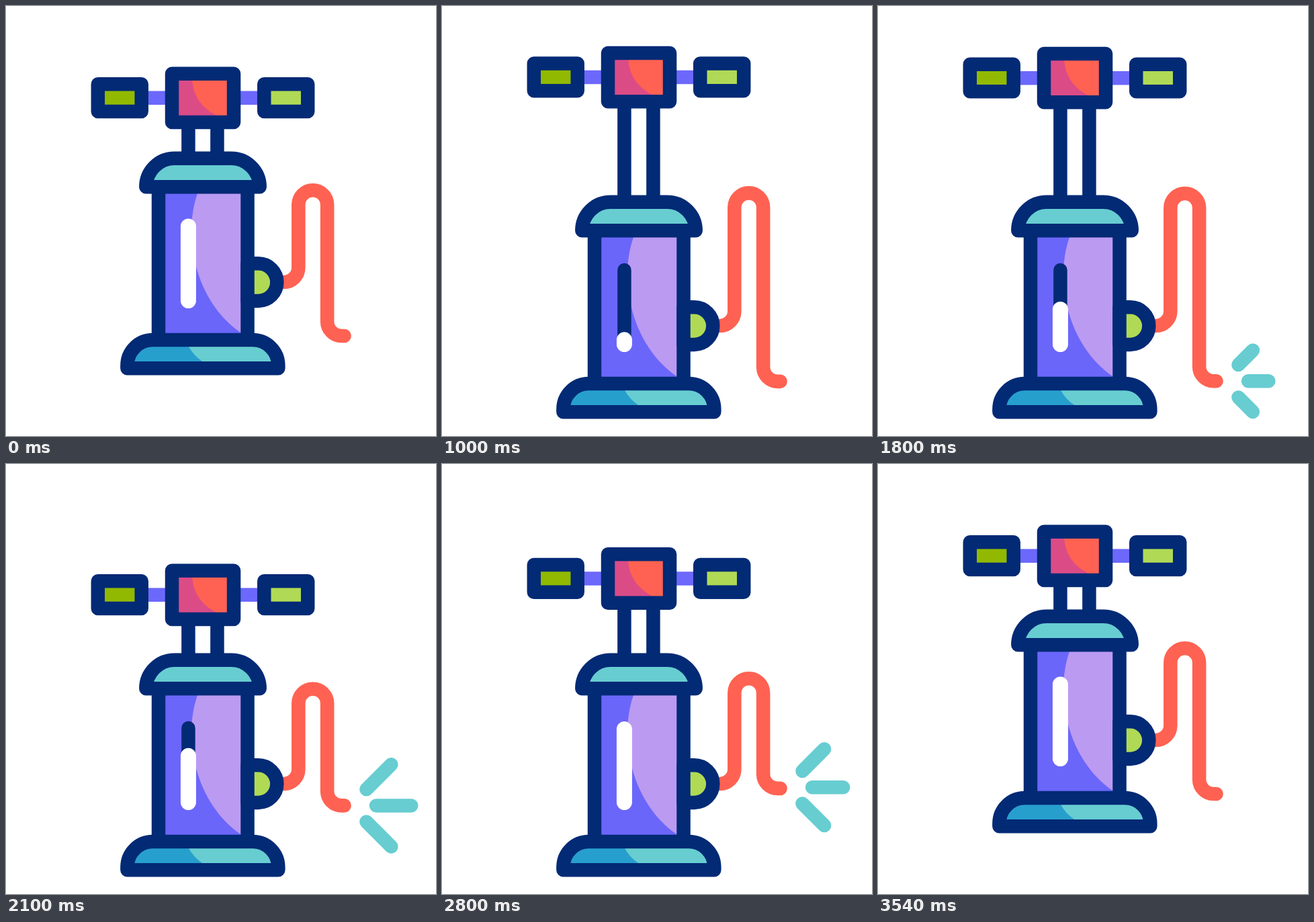
An HTML page with a canvas that plays this animation: 640x640 px, repeating every 3.6 s.

```html
<!DOCTYPE html>
<html lang="en">
<head>
<meta charset="utf-8">
<title>Air pump</title>
<style>
  html, body { margin: 0; width: 100%; height: 100%; overflow: hidden; background: #fff; }
  canvas { display: block; }
</style>
</head>
<body>
<canvas id="stage" width="640" height="640"></canvas>
<script>
const ctx = document.getElementById('stage').getContext('2d');

const NAVY = '#032a75', CORAL = '#ff6252', PINK = '#db4c87', TEAL = '#67cdd1', BLUE = '#279fcd';
const VIOLET = '#6b66fa', LILAC = '#bb9af2', OLIVE = '#92b902', LIME = '#b0da55';
const LINE = 20.5;

// Timing in ms
const LOOP = 3600, PUMP_START = 596, STROKE = 392.5, PUMP_END = PUMP_START + 6 * STROKE;
const LIFT_START = 2975, LIFT_END = 3545;
const FILL_START = 990, FILL_END = 2830;
const BURST_START = PUMP_START + STROKE, FADE_START = 2960, FADE_END = 3352;

// Distances in px
const DROP = 65, HEAD_RISE = 96, ARCH_RISE = 61;
const HOSE = { rest: 491, short: 381, mid: 439.4, long: 494 };
const SLIDER = { bottom: 438.5, full: 110.6, low: 6 };

const clamp = x => Math.min(1, Math.max(0, x));
const progress = (t, a, b) => clamp((t - a) / (b - a));
const ease = x => x * x * (3 - 2 * x);
const mix = (a, b, k) => a + (b - a) * k;

function fill(path, color) {
  ctx.fillStyle = color;
  ctx.fill(new Path2D(path));
}

function stroke(path, color = NAVY, width = LINE, cap = 'round') {
  ctx.strokeStyle = color;
  ctx.lineWidth = width;
  ctx.lineCap = cap;
  ctx.lineJoin = 'round';
  ctx.stroke(new Path2D(path));
}

function shape(path, color) {
  fill(path, color);
  stroke(path);
}

function at(y, draw) {
  ctx.save();
  ctx.translate(0, y);
  draw();
  ctx.restore();
}

function drawHead() {
  stroke('M205 136.8H380', '#6c68fb', LINE, 'butt');
  shape('M136.8 116.3H201.7V157H136.8Z', OLIVE);
  shape('M384.2 116.3H449.2V157H384.2Z', LIME);
  fill('M247 100.7H339V173H247Z', CORAL);
  fill('M247 100.7H277V110.5Q280 146 313 163V173H247Z', PINK);
  stroke('M247 100.7H339V173H247Z');
}

function drawBody(level) {
  fill('M227 269H359.5V497H227Z', LILAC);
  fill('M227 269H288L285 279C262 345 283 440 349 486V497H227Z', VIOLET);
  stroke('M271.4 328V438.5');
  if (level > 0) {
    stroke(`M271.4 ${SLIDER.bottom - level}V${SLIDER.bottom}`, '#fff', 23);
  }
  stroke('M227 269V497M359.5 269V497');
  shape('M359.5 383.3H375.5A27.8 27.8 0 0 1 375.5 438.9H359.5Z', LIME);
  shape('M208.3 269.3A42.6 42.6 0 0 1 250.9 226.7H335.1A42.6 42.6 0 0 1 377.7 269.3Z', TEAL);

  const base = 'M180.4 539.3V535A38 38 0 0 1 218.4 497H367.3A38 38 0 0 1 405.3 535V539.3Z';
  fill(base, TEAL);
  fill('M180.4 539.3V535A38 38 0 0 1 218.4 497H268L272 507Q279 520 292 529V539.3Z', BLUE);
  stroke(base);
}

function drawHose(arch, end) {
  stroke(`M411 411H413.5A21.8 21.8 0 0 0 435.3 389.2V${arch}A21.4 21.4 0 0 1 478.1 ${arch}` +
    `V${end - 21.5}A21.5 21.5 0 0 0 499.6 ${end}H503.5`, CORAL, 20.6);
}

function drawBurst(y, from, to) {
  if (to - from < 0.3) return;
  const near = from * Math.SQRT1_2, far = to * Math.SQRT1_2;
  stroke(`M${551 + from} ${y}H${551 + to}`, TEAL);
  for (const side of [-1, 1]) {
    stroke(`M${536.4 + near} ${y + side * (24.2 + near)}L${536.4 + far} ${y + side * (24.2 + far)}`, TEAL);
  }
}

function draw(t) {
  const down = t < LIFT_START
    ? ease(progress(t, 0, PUMP_START))
    : 1 - ease(progress(t, LIFT_START, LIFT_END));
  const drop = DROP * down;

  // Even strokes pull the handle up, odd strokes push it down
  const pumping = t >= PUMP_START && t < PUMP_END;
  const steps = (t - PUMP_START) / STROKE;
  const index = Math.floor(steps);
  const part = ease(steps - index);
  const lift = pumping ? (index % 2 ? 1 - part : part) : 0;

  const low = index === 0 || index === 5 ? HOSE.short : HOSE.mid;
  const end = pumping ? mix(low, HOSE.long, lift) : mix(HOSE.rest, HOSE.short, down);

  const level = t < FILL_START
    ? mix(SLIDER.full, SLIDER.low, down)
    : mix(SLIDER.low, SLIDER.full, progress(t, FILL_START, FILL_END));

  ctx.fillStyle = '#fff';
  ctx.fillRect(0, 0, 640, 640);

  at(drop, () => {
    const headShift = -HEAD_RISE * lift;
    stroke(`M271.4 ${173 + headShift}V227M314.4 ${173 + headShift}V227`, NAVY, LINE, 'butt');
    drawHose(295.6 - ARCH_RISE * lift, end);
    drawBody(level);
    at(headShift, drawHead);
  });

  if (t > BURST_START && t < FADE_END) {
    const reach = index === 1 ? 54 * (1 - lift) : 54 - 24 * lift;
    const y = index < 5 ? end + DROP : mix(443.5, HOSE.long + DROP, lift);
    drawBurst(y, 54 * ease(progress(t, FADE_START, FADE_END)), reach);
  }
}

const start = performance.now();
function tick() {
  draw((performance.now() - start) % LOOP);
  requestAnimationFrame(tick);
}
tick();
</script>
</body>
</html>
```
